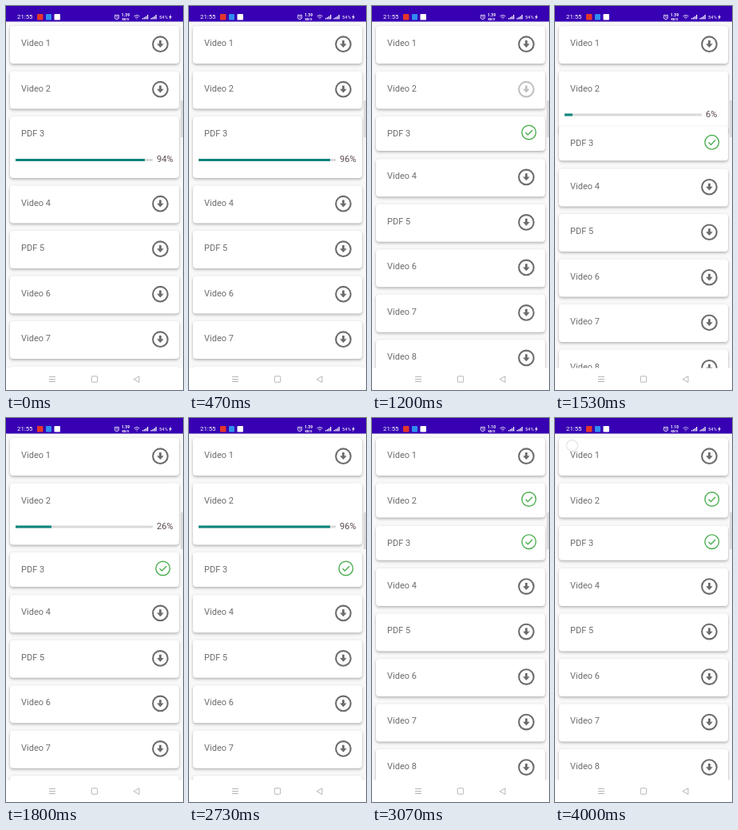
An HTML page for the animation above (4.07 s loop, 222 by 480 pixels).

```html
<!DOCTYPE html>
<html lang="en">
<head>
<meta charset="utf-8">
<title>Download list</title>
<style>
  html, body { margin: 0; width: 100%; height: 100%; overflow: hidden; }
  body { position: relative; background: #f8f8f8; font: 11px Roboto, sans-serif; color: #6c6c6c; }
  svg { position: absolute; left: 0; top: 0; overflow: visible; }
  .card {
    position: absolute; left: 5px; top: 0; width: 212px; border-radius: 4px;
    background: #fff; box-shadow: 0 1.5px 3.5px rgba(0, 0, 0, .3);
  }
  .title { position: absolute; left: 14px; line-height: 44px; }
  .progress { position: absolute; left: 7px; top: 53px; width: 172px; height: 2.7px; background: #d9d9d9; }
  .fill { height: 100%; background: #0b857c; }
  .percent { position: absolute; left: 177px; top: -10px; font-size: 11.2px; line-height: 22px; color: #5b4a54; }
  #scrollbar { position: absolute; right: 0; top: 118px; width: 3px; height: 46px; background: #dcdcdc; }
  #touch {
    position: absolute; width: 13px; height: 13px; border-radius: 50%;
    border: .8px solid rgba(0, 0, 0, .13); background: rgba(255, 255, 255, .62);
  }
</style>
</head>
<body>
<div id="list"></div>
<div id="scrollbar"></div>
<div id="touch"></div>

<svg width="222" height="480" font-family="Roboto, sans-serif">
  <defs>
    <g id="download">
      <circle r="9.3" fill="none" stroke="#6c6c6c" stroke-width="2.1"/>
      <path d="M-1.4-4.6h2.8v4.2h2.9L0 4.3-4.3-.4h2.9z" fill="#6c6c6c"/>
    </g>
    <g id="check" fill="none" stroke="#4caf50" stroke-width="1.4">
      <circle r="8.8"/>
      <path d="M-4.2.2l2.9 2.9L4.4-2.8"/>
    </g>
    <path id="signal" d="M0 6h1.3v-1.4H0zM2 6h1.3V3.4H2zM4 6h1.3V2.2H4zM6 6h1.3V.6H6z"/>
  </defs>
  <rect width="222" height="19.5" fill="#3700b3"/>
  <g fill="#fff">
    <text x="14" y="16.4" font-size="7.8">21:55</text>
    <rect x="39" y="10" width="7.5" height="7.5" rx="1" fill="#e5352b"/>
    <rect x="50" y="10" width="7" height="7.5" rx="1" fill="#2f8df0"/>
    <rect x="60.5" y="10" width="7.5" height="7.5" rx="1"/>
    <text x="145" y="13.2" font-size="5" font-weight="700" id="speed">1.39</text>
    <text x="145.5" y="17.6" font-size="4" font-weight="700">KB/S</text>
    <use href="#signal" x="171" y="10.5"/>
    <use href="#signal" x="181.5" y="10.5"/>
    <text x="192" y="16" font-size="6">54%</text>
    <path d="M206.8 10.5l-2.6 3.8h1.7l-.7 3 2.8-4.1h-1.7z"/>
  </g>
  <g fill="none" stroke="#fff" stroke-width=".8">
    <circle cx="139" cy="14" r="2.6"/>
    <path d="M139 12.4v1.8h1.2M135.9 12.1l1.5-1.3M142.1 12.1l-1.5-1.3"/>
    <path id="wifi" d="M160.5 12.8q3.5-3 7 0M162 14.5q2-1.7 4 0M163.5 16h1"/>
  </g>
  <rect y="452.5" width="222" height="27.5" fill="#fff"/>
  <g fill="none" stroke="#a2a2a2" stroke-width=".8">
    <path d="M54 463.5h8M54 466.5h8M54 469.5h8M167 462.8v7.6l-6.8-3.8z"/>
    <rect x="107.3" y="462.8" width="7.4" height="7.4" rx=".8"/>
  </g>
</svg>

<script>
const LOOP = 4070, MOVE = 250, GAP = 9.9;
const IDLE = 46.6, LOADING = 76.6, DONE = 43.3;
const PDF_DONE = 948, VIDEO_START = 1420, VIDEO_DONE = 2810;
const $ = id => document.getElementById(id);
const clamp = x => Math.min(1, Math.max(0, x));
const ease = (t, start) => (1 - Math.cos(Math.PI * clamp((t - start) / MOVE))) / 2;

const names = ["Video 1", "Video 2", "PDF 3", "Video 4", "PDF 5", "Video 6", "Video 7", "Video 8"];
const cards = names.map(name => {
  const el = document.createElement("div");
  el.className = "card";
  el.innerHTML = `<div class="title">${name}</div>
    <svg width="1" height="1"><use class="down" href="#download" x="188.5" y="22.7"/>
    <use class="tick" href="#check" x="191.8" y="20"/></svg>
    <div class="progress"><div class="fill"></div><div class="percent"></div></div>`;
  $("list").append(el);
  const part = c => el.querySelector("." + c);
  return { el, down: part("down"), tick: part("tick"), progress: part("progress"),
           fill: part("fill"), percent: part("percent") };
});

// height snaps at once; space is the animated room the card takes in the list
function stateOf(i, t) {
  const s = { height: IDLE, space: IDLE, down: 1, tick: 0, percent: -1 };
  if (i === 2) {
    const k = ease(t, PDF_DONE), done = t >= PDF_DONE;
    s.height = done ? DONE : LOADING;
    s.space = LOADING + (DONE - LOADING) * k;
    s.down = 0;
    s.tick = k;
    if (!done) s.percent = 94 + (t >= 200) + (t >= 470) + (t >= 730);
  } else if (i === 1) {
    const done = t >= VIDEO_DONE, started = t >= VIDEO_START, k = ease(t, VIDEO_DONE);
    s.height = done ? DONE : started ? LOADING : IDLE;
    s.space = IDLE + (LOADING - IDLE) * ease(t, VIDEO_START) + (DONE - LOADING) * k;
    s.down = started ? 0 : 1 - .58 * clamp((t - 1070) / 130);
    s.tick = k;
    if (started && !done) s.percent = Math.floor(Math.min(100, Math.max(0, 26.5 + (t - 1800) * .0753)));
  }
  return s;
}

function draw(t) {
  let y = 25;
  cards.forEach((c, i) => {
    const s = stateOf(i, t);
    c.el.style.transform = `translateY(${y}px)`;
    c.el.style.height = s.height + "px";
    c.down.style.opacity = s.down;
    c.tick.style.opacity = s.tick;
    c.progress.style.display = s.percent < 0 ? "none" : "";
    c.fill.style.width = s.percent + "%";
    c.percent.textContent = s.percent + "%";
    y += s.space + GAP;
  });

  const onVideo = t >= 930 && t < 1130;
  const touch = $("touch").style;
  touch.display = onVideo || t >= 3800 ? "" : "none";
  touch.left = (onVideo ? 190 : 14) + "px";
  touch.top = (onVideo ? 98 : 27) + "px";
  $("speed").textContent = t < 2930 ? "1.39" : "1.10";
  $("wifi").style.opacity = t < 3470 ? 1 : .8;
}

function tick() {
  draw(performance.now() % LOOP);
  requestAnimationFrame(tick);
}
tick();
</script>
</body>
</html>
```
